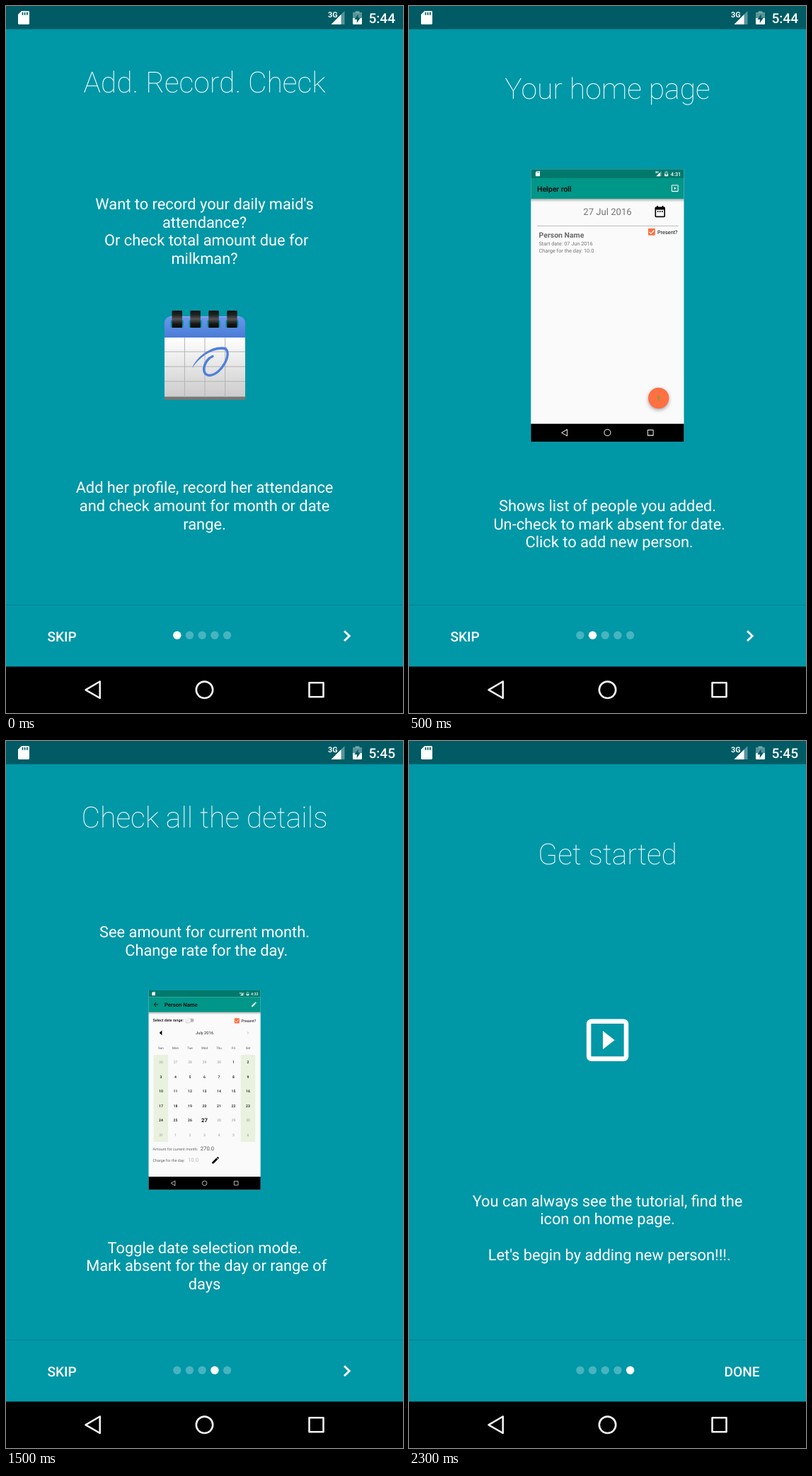
Recreate the animation shown at these times as an HTML page with a canvas. Size 561 by 998 pixels, loop 2500 ms.

```html
<!DOCTYPE html>
<html lang="en">
<head>
<meta charset="utf-8">
<title>App tour</title>
<style>
html, body { margin: 0; width: 100%; height: 100%; overflow: hidden; background: #0097a7; }
canvas { display: block; }
</style>
</head>
<body>
<canvas id="stage" width="561" height="998"></canvas>
<script>
const ctx = document.getElementById('stage').getContext('2d');
const W = 561, H = 998, MID = 280.5, PAGE_MS = 500;
const TEAL = '#0097a7', GREEN = '#009688', ORANGE = '#ff7043', PAPER = '#fafafa', GREY = '#757575';

function rect(x, y, w, h, color, radius = 0) {
  ctx.fillStyle = color;
  ctx.beginPath();
  ctx.roundRect(x, y, w, h, radius);
  ctx.fill();
}

function circle(x, y, r, color) {
  ctx.fillStyle = color;
  ctx.beginPath();
  ctx.arc(x, y, r, 0, Math.PI * 2);
  ctx.fill();
}

function trace(points) {
  ctx.beginPath();
  points.forEach(([x, y]) => ctx.lineTo(x, y));
}

function poly(color, ...points) {
  trace(points);
  ctx.fillStyle = color;
  ctx.fill();
}

function line(color, width, ...points) {
  trace(points);
  ctx.strokeStyle = color;
  ctx.lineWidth = width;
  ctx.stroke();
}

function text(str, x, y, size, color = '#fff', weight = 400, align = 'left') {
  ctx.font = `${weight} ${size}px Roboto, sans-serif`;
  ctx.textAlign = align;
  ctx.fillStyle = color;
  ctx.fillText(str, x, y);
}

const title = (str, y) => text(str, MID, y, 40.9, '#fff', 100, 'center');
const paragraph = (y, ...lines) =>
  lines.forEach((str, i) => text(str, MID, y + i * 25.6, 21.8, '#fff', 400, 'center'));

function gradient(x0, y0, x1, y1, ...colors) {
  const g = ctx.createLinearGradient(x0, y0, x1, y1);
  colors.forEach((c, i) => g.addColorStop(i / (colors.length - 1), c));
  return g;
}

// Status and navigation bars, in full-stage units.
function systemBars(clock, barColor) {
  const dim = 'rgba(255,255,255,.35)', icon = '#f1f1f1';
  rect(0, 0, W, 32.7, barColor);
  poly('#fff', [22, 7], [32, 7], [33, 8], [33, 25], [32, 26], [18, 26], [17, 25], [17, 12]);
  for (let i = 0; i < 3; i++) rect(22.6 + i * 3.2, 8.8, 1.7, 4, barColor);
  text('3G', 455, 16, 10.8, '#fff', 700);
  poly(dim, [459.5, 26], [478.5, 26], [478.5, 7]);
  poly('#fff', [459.5, 26], [473.5, 26], [473.5, 12]);
  rect(493.5, 7, 6, 3, dim);
  rect(490, 9, 13, 8, dim);
  rect(490, 17, 13, 9, '#fff', [0, 0, 1, 1]);
  poly(barColor, [497.6, 11.5], [492.3, 19], [495.8, 19], [495.8, 24], [501, 16.5], [497.6, 16.5]);
  text(clock, 550, 24.2, 19.1, '#fff', 500, 'right');

  rect(0, 932.5, W, 65.5, '#000');
  ctx.strokeStyle = icon;
  ctx.lineWidth = 2.6;
  ctx.lineJoin = 'round';
  trace([[112.5, 965.3], [132.7, 953.5], [132.7, 977]]);
  ctx.closePath();
  ctx.stroke();
  ctx.beginPath();
  ctx.arc(MID, 965.3, 11.7, 0, Math.PI * 2);
  ctx.stroke();
  ctx.strokeRect(428.5, 955.2, 20, 20);
  ctx.lineJoin = 'miter';
}

function miniPhone(x, y, width, clock) {
  const k = width / W;
  ctx.save();
  ctx.translate(x, y);
  ctx.scale(k, k);
  rect(0, 0, W, H, PAPER);
  systemBars(clock, '#00796b');
  rect(0, 32.7, W, 76.4, GREEN);
  rect(0, 109.1, W, 12, gradient(0, 109, 0, 121, 'rgba(0,0,0,.28)', 'rgba(0,0,0,0)'));
  ctx.restore();
}

function playIcon(cx, cy, size) {
  const w = size * 0.11, h = size / 2;
  ctx.strokeStyle = '#fff';
  ctx.lineWidth = w;
  ctx.beginPath();
  ctx.roundRect(cx - h + w / 2, cy - h + w / 2, size - w, size - w, size * 0.06);
  ctx.stroke();
  poly('#fff', [cx - size * 0.11, cy - size * 0.22], [cx + size * 0.17, cy], [cx - size * 0.11, cy + size * 0.22]);
}

function dateIcon(x, y) {
  rect(x, y + 1.6, 14.5, 14.6, '#000', 1.6);
  rect(x + 2.6, y, 1.7, 3, '#000');
  rect(x + 10.2, y, 1.7, 3, '#000');
  rect(x + 1.6, y + 5.6, 11.3, 9, PAPER);
  for (let i = 0; i < 3; i++) rect(x + 3.3 + i * 3.1, y + 7.3, 1.7, 1.7, '#000');
}

function checkbox(x, y, size) {
  rect(x, y, size, size, ORANGE, size * 0.1);
  const at = (u, v) => [x + size * u, y + size * v];
  line('#fff', size * 0.12, at(0.17, 0.52), at(0.4, 0.74), at(0.84, 0.28));
}

function backArrow(x, y, size) {
  const h = size / 2;
  line('#000', size * 0.13, [x + size, y], [x + 0.5, y]);
  line('#000', size * 0.13, [x + h, y - h], [x + 0.4, y], [x + h, y + h]);
}

function pencil(x, y, size, color) {
  const at = (u, v) => [x + size * u, y + size * v];
  poly(color, at(0, 1), at(0, 0.79), at(0.61, 0.18), at(0.82, 0.39), at(0.21, 1));
  poly(color, at(0.67, 0.12), at(0.8, 0), at(1, 0.2), at(0.88, 0.33));
}

function deskCalendar() {
  rect(224, 438, 114, 31, gradient(0, 438, 0, 468, '#6c98ed', '#4b7bd6'), [9, 9, 0, 0]);
  line('#8cb0f3', 1, [232, 438.7], [330, 438.7]);
  rect(224, 468, 114, 84, gradient(0, 468, 0, 552, '#fff', '#cbcbcb'));
  rect(224, 551.5, 114, 4.5, '#777');
  for (let i = 1; i < 4; i++) {
    line('#b3b3b3', 1, [223.8 + i * 28.6, 468], [223.8 + i * 28.6, 552]);
    line('#b3b3b3', 1, [224, 467 + i * 21], [338, 467 + i * 21]);
  }
  for (let i = 0; i < 4; i++) {
    const x = 234.5 + i * 25.9;
    rect(x - 2, 443, 18.5, 11.5, TEAL, 3);
    rect(x, 430, 14.5, 24, gradient(0, 430, 0, 454, '#111', '#222', '#555', '#1c1c1c', '#000'), 1);
  }
  ctx.fillStyle = ctx.strokeStyle = '#4f7fdb';
  ctx.beginPath();
  ctx.moveTo(263, 511.5);
  ctx.bezierCurveTo(270, 492, 296, 477, 312, 482.5);
  ctx.lineTo(310, 485.5);
  ctx.bezierCurveTo(293, 482, 273, 495, 263, 511.5);
  ctx.fill();
  ctx.lineWidth = 3.4;
  ctx.lineCap = 'round';
  ctx.beginPath();
  ctx.moveTo(309, 483.5);
  ctx.bezierCurveTo(321, 488, 305, 521, 287, 521.5);
  ctx.bezierCurveTo(274, 520, 280, 499, 292, 494.5);
  ctx.stroke();
  ctx.lineCap = 'butt';
}

function welcomePage() {
  title('Add. Record. Check', 121.5);
  paragraph(287, "Want to record your daily maid's", 'attendance?', ' Or check total amount due for', 'milkman?');
  deskCalendar();
  paragraph(687.3, 'Add her profile, record her attendance', 'and check amount for month or date', 'range.');
}

function homePage() {
  title('Your home page', 131);
  miniPhone(172.3, 230.3, 216.2, '4:31');
  text('Helper roll', 181, 261.7, 10.5, '#000', 500);
  playIcon(375.8, 257.3, 9.8);
  text('27 Jul 2016', MID, 294.8, 13.1, GREY, 400, 'center');
  dateIcon(347.5, 282);
  line('#bdbdbd', 1.2, [181, 310.5], [381, 310.5]);
  checkbox(338, 314, 9.8);
  text('Present?', 351, 321.5, 7.35, '#111');
  text('Person Name', 183.5, 326.8, 10.5, '#6b6b6b', 700);
  text('Start date: 07 Jun 2016', 183.5, 337.7, 7.35, GREY);
  text('Charge for the day: 10.0', 183.5, 348, 7.35, GREY);
  ctx.save();
  ctx.shadowColor = 'rgba(0,0,0,.35)';
  ctx.shadowBlur = 5;
  ctx.shadowOffsetY = 2;
  circle(352.7, 553.5, 14.7, ORANGE);
  ctx.restore();
  rect(351.8, 549.5, 1.8, 7.5, '#8f9a2c');
  rect(350.5, 551.5, 4.4, 1.8, '#8f9a2c');
  paragraph(713, 'Shows list of people you added.', ' Un-check to mark absent for date.', ' Click to add new person.');
}

function formField(label, x, y, end) {
  text(label, x, y, 9.45, '#7a7a7a');
  line('#8c8c8c', 0.8, [x, y + 4], [end, y + 4]);
}

function profilePage() {
  title('Create profile', 131);
  miniPhone(172.3, 230.3, 216.2, '4:33');
  backArrow(183, 257.8, 8.4);
  text('Add new wager', 204, 261.7, 10.5, '#000', 500);
  text('Please fill in details:', 177.7, 285.2, 7.35, GREY);
  formField('Name', 211, 306, 350);
  formField('Charge per day', 211, 342.7, 350);
  formField('Start date in dd MMM yyyy', 212.3, 379.6, 329.5);
  dateIcon(333.8, 368.3);
  text('Days of week', 203.7, 411, 9.45, GREY);
  [...'SMTWTFS'].forEach((day, i) => {
    const x = 199.4 + i * 23.65;
    rect(x, 430, 20.4, 20, '#d6d7d7', 1);
    rect(x + 0.3, 447.6, 19.8, 1.5, ORANGE);
    text(day, x + 10.2, 442.3, 7.35, '#111', 500, 'center');
  });
  rect(177.7, 559, 205.6, 25, GREEN);
  text('SAVE', MID, 574.2, 7.35, '#fff', 500, 'center');
  paragraph(726, 'Add the person, specify charge per day,', 'start date and days of week availability');
}

function monthGrid() {
  const colX = i => 219 + i * 20.5;
  rect(208.7, 443, 20.4, 123, '#e9f1df');
  rect(331.8, 443, 20.4, 123, '#e9f1df');
  ['Sun', 'Mon', 'Tue', 'Wed', 'Thu', 'Fri', 'Sat'].forEach((day, i) =>
    text(day, colX(i), 434.8, 4.6, '#555', 400, 'center'));
  for (let i = 0; i < 42; i++) {
    const day = i - 4, today = day === 27, active = day > 0 && day <= 27;
    const label = new Date(2016, 6, day).getDate();
    const y = 455.2 + Math.floor(i / 7) * 20.5;
    text(label, colX(i % 7), today ? y + 1 : y, today ? 7.7 : 5.1,
      active ? '#111' : '#999', today ? 700 : active ? 500 : 400, 'center');
  }
}

function detailsPage() {
  title('Check all the details', 121.5);
  paragraph(277.3, 'See amount for current month.', ' Change rate for the day.');
  miniPhone(201.5, 352, 158.2, '4:32');
  backArrow(209, 372, 6.2);
  text('Person Name', 224, 375, 7.68, '#000', 500);
  pencil(347, 368.3, 7, '#fff');
  text('Select date range:', 207.5, 396.4, 5.38, '#111', 500);
  rect(255, 391.8, 10.5, 5, '#b4b4b4', 2.5);
  circle(257.3, 394.7, 3.9, '#d0d0d0');
  circle(257.3, 394.2, 3.6, '#f1f1f1');
  checkbox(322.7, 391.3, 7.2);
  text('Present?', 332.5, 396.8, 5.38, '#111');
  poly('#000', [216.8, 412], [220.4, 408.4], [220.4, 415.6]);
  poly('#ddd', [343.8, 412], [340.8, 409.4], [340.8, 414.6]);
  text('July 2016', MID, 414.3, 5.76, '#222', 400, 'center');
  monthGrid();
  text('Amount for current month:', 207.5, 578, 5.38, '#666');
  text('270.0', 274.8, 578, 7.68, '#555');
  text('Charge for the day:', 207.5, 593.8, 5.38, '#666');
  text('10.0', 257, 593.8, 7.68, '#bbb');
  pencil(291.3, 586.8, 9.8, '#000');
  paragraph(722.7, 'Toggle date selection mode.', ' Mark absent for the day or range of', 'days');
}

function startPage() {
  title('Get started', 174);
  playIcon(280.5, 422.2, 59.4);
  paragraph(656.6, 'You can always see the tutorial, find the', 'icon on home page.', '', " Let's begin by adding new person!!!.");
}

const pages = [welcomePage, homePage, profilePage, detailsPage, startPage];

function footer(current) {
  rect(0, 845, W, 1, '#00818f');
  pages.forEach((_, i) =>
    circle(241.8 + i * 17.7, 888.2, 5.7, i === current ? '#fff' : 'rgba(255,255,255,.28)'));
  if (current === pages.length - 1) {
    text('DONE', 445.5, 896.5, 19.1, '#fff', 500);
  } else {
    text('SKIP', 58.5, 896.5, 19.1, '#fff', 500);
    line('#fff', 2.9, [478, 882.2], [485.2, 889.2], [478, 896.2]);
  }
}

function draw(now) {
  const current = Math.floor(now / PAGE_MS) % pages.length;
  ctx.textRendering = 'geometricPrecision';
  rect(0, 0, W, H, TEAL);
  systemBars(current < 3 ? '5:44' : '5:45', '#005b64');
  pages[current]();
  footer(current);
  requestAnimationFrame(draw);
}
requestAnimationFrame(draw);
</script>
</body>
</html>
```
